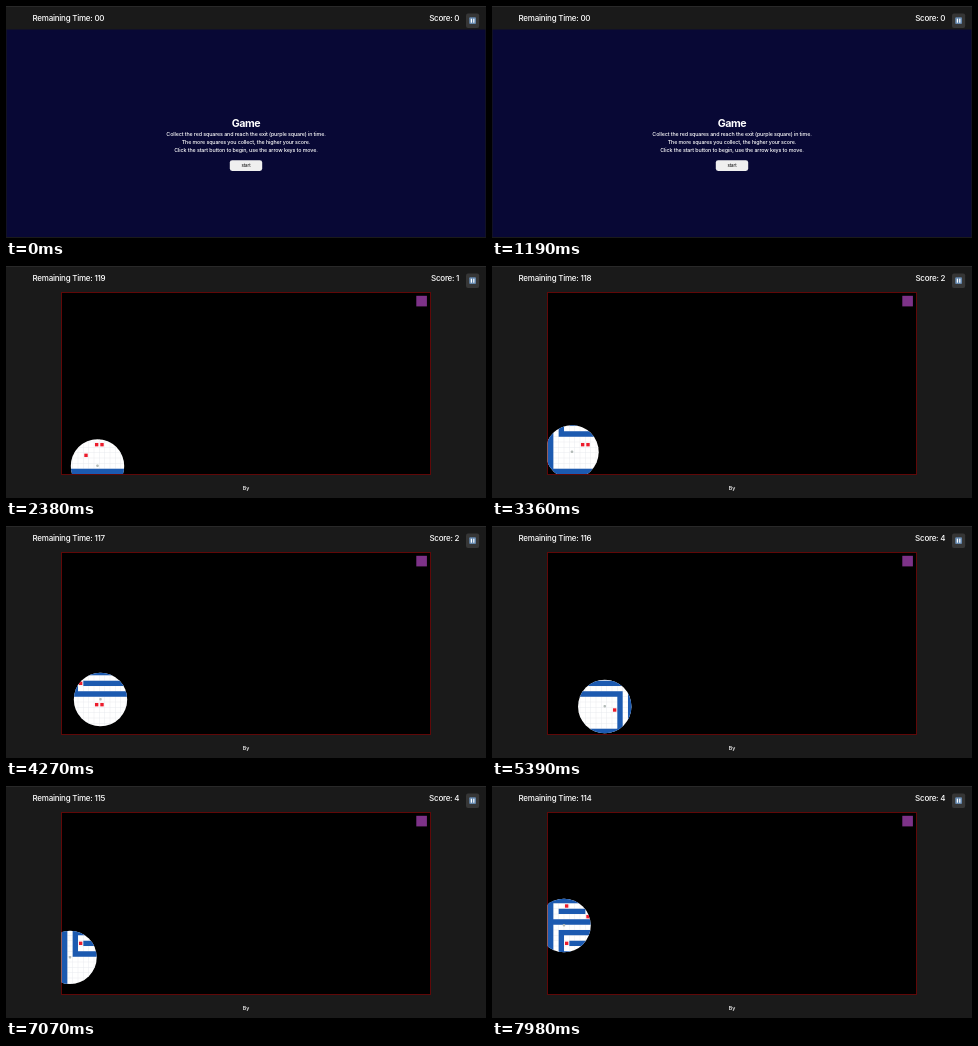
Recreate the animation shown at these times as an HTML page with a canvas. Size 480 by 232 pixels, loop 8 s.

```html
<!DOCTYPE html>
<html lang="en">
<head>
<meta charset="utf-8">
<title>Maze game</title>
<style>
  html, body { margin: 0; width: 100%; height: 100%; overflow: hidden; background: #1a1a1a; }
  canvas { display: block; width: 480px; height: 232px; }
</style>
</head>
<body>
<canvas id="stage"></canvas>
<script>
const LOOP = 8000, STEP = 70, GAME_AT = 1400, CLOCK_AT = 1090;
const TILE = 16 / 3, LEFT = 56, TOP = 27, BOTTOM = 208, WIDTH = 368;
const RADIUS = 26.7, SPEED = 0.065, REACH = 4.8;

const canvas = document.getElementById('stage');
const ctx = canvas.getContext('2d');
const ratio = window.devicePixelRatio || 1;
canvas.width = 480 * ratio;
canvas.height = 232 * ratio;

// Centre of a tile; rows count up from the bottom
const tileX = col => LEFT + (col + 0.5) * TILE;
const tileY = row => BOTTOM - (row + 0.5) * TILE;

// Wall corners in tiles
const walls = [
  [[0, 33], [0, 0], [13, 0], [13, 7], [2, 7], [2, 11], [17, 11]],
  [[4, 9], [15, 9], [15, 0], [13, 0]],
  [[0, 13], [13, 13]],
  [[2, 15], [6, 15]],
  [[0, 17], [9, 17]]
];

// Key presses: start time, then the distance right and down, walked at SPEED
const presses = [
  [1820, 27.5, 0], [2660, -11.5, 0], [2940, 0, -14], [3500, 0, -12.5],
  [3710, 21, 0], [4170, -13, 0], [4400, 0, 7], [4550, 28, 0],
  [5340, -49, 0], [6560, -3, 0], [6930, 0, -41], [7600, 10, 0], [7840, -2, 0]
];

function playerAt(t) {
  let x = 64, y = 200;
  for (const [from, dx, dy] of presses) {
    const walked = Math.max(0, (t - from) * SPEED);
    const part = Math.min(1, walked / Math.hypot(dx, dy));
    x += dx * part;
    y += dy * part;
  }
  return [x, y];
}

// A red square is taken the first time the player touches it
function takenAt(x, y) {
  for (let t = GAME_AT; t < LOOP; t += STEP) {
    const [px, py] = playerAt(t);
    if (Math.abs(px - x) < REACH && Math.abs(py - y) < REACH) return t;
  }
  return Infinity;
}

const gems = [[7, 1], [4, 3], [6, 5], [7, 5], [12, 4], [3, 9], [3, 16], [7, 14]]
  .map(([col, row]) => {
    const x = tileX(col), y = tileY(row);
    return { x, y, taken: takenAt(x, y) };
  });

function box(color, x, y, w, h) {
  ctx.fillStyle = color;
  ctx.fillRect(x, y, w, h);
}

function round(color, x, y, w, h, r) {
  ctx.fillStyle = color;
  ctx.beginPath();
  ctx.roundRect(x, y, w, h, r);
  ctx.fill();
}

// Larger type is tracked more tightly
function text(str, x, y, size, align = 'center', weight = 500, color = '#fff') {
  ctx.font = `${weight} ${size}px Inter, sans-serif`;
  ctx.letterSpacing = `${-0.0038 * size * size}px`;
  ctx.textAlign = align;
  ctx.fillStyle = color;
  ctx.fillText(str, x, y);
}

function header(time, score) {
  box('#303030', 0, 0, 480, 0.7);
  text('Remaining Time: ' + time, 26.5, 15, 8, 'left');
  text('Score: ' + score, 453.2, 15, 8, 'right');
  round('#363636', 460, 7.5, 13.2, 14.5, 2);
  round('#6487ad', 463.2, 11.3, 6.8, 6.8, 1);
  box('#fff', 464.8, 12.7, 1.2, 4);
  box('#fff', 467.2, 12.7, 1.2, 4);
}

function intro() {
  box('#080835', 0.5, 23.5, 479, 207.5);
  header('00', 0);
  text('Game', 240, 120.8, 32 / 3, 'center', 700);
  [
    'Collect the red squares and reach the exit (purple square) in time.',
    'The more squares you collect, the higher your score.',
    'Click the start button to begin, use the arrow keys to move.'
  ].forEach((line, i) => text(line, 240, 130 + i * 8, TILE));
  round('#efefef', 223.8, 154.2, 32.4, 10.7, 2.4);
  text('start', 240, 161.1, 4.44, 'center', 400, '#000');
}

function drawWalls() {
  ctx.strokeStyle = '#1c5ab0';
  ctx.lineWidth = TILE;
  ctx.lineCap = 'square';
  ctx.lineJoin = 'miter';
  for (const corners of walls) {
    ctx.beginPath();
    for (const [col, row] of corners) ctx.lineTo(tileX(col), tileY(row));
    ctx.stroke();
  }
}

function spotlight(t) {
  const [px, py] = playerAt(t);
  ctx.save();
  ctx.beginPath();
  ctx.rect(LEFT - 0.3, TOP, WIDTH, BOTTOM - TOP);
  ctx.clip();
  ctx.beginPath();
  ctx.arc(px, py, RADIUS, 0, Math.PI * 2);
  ctx.clip();

  box('#fff', LEFT - 1, TOP, WIDTH, BOTTOM - TOP);
  for (let i = 0; i < 30; i++) {
    box('#e3e6ec', LEFT + i * TILE - 0.2, TOP, 0.4, BOTTOM - TOP);
    box('#e3e6ec', LEFT, BOTTOM - i * TILE - 0.2, WIDTH, 0.4);
  }
  drawWalls();
  for (const { x, y, taken } of gems) {
    if (t < taken) box('#ec1c2c', x - 1.7, y - 1.7, 3.4, 3.4);
  }
  round('#b4bbb8', px - 1.2, py - 1.5, 2.4, 2.6, 0.8);
  ctx.restore();
}

function game(t) {
  const score = gems.filter(gem => t >= gem.taken).length;
  header(120 - Math.floor((t - CLOCK_AT) / 1000), score);
  box('#600808', LEFT - 1, TOP - 1, WIDTH + 2, BOTTOM - TOP + 2);
  box('#000', LEFT, TOP, WIDTH, BOTTOM - TOP);
  box('#7d3288', 410.3, 29.8, 10.6, 10.6);
  spotlight(t);
  text('By', 240, 223.5, TILE);
}

function draw(now) {
  const t = Math.floor((now % LOOP) / STEP) * STEP;
  ctx.setTransform(ratio, 0, 0, ratio, 0, 0);
  box('#1a1a1a', 0, 0, 480, 232);
  if (t < GAME_AT) intro();
  else game(t);
}

const start = performance.now();
function tick() {
  draw(performance.now() - start);
  requestAnimationFrame(tick);
}
tick();
</script>
</body>
</html>
```
